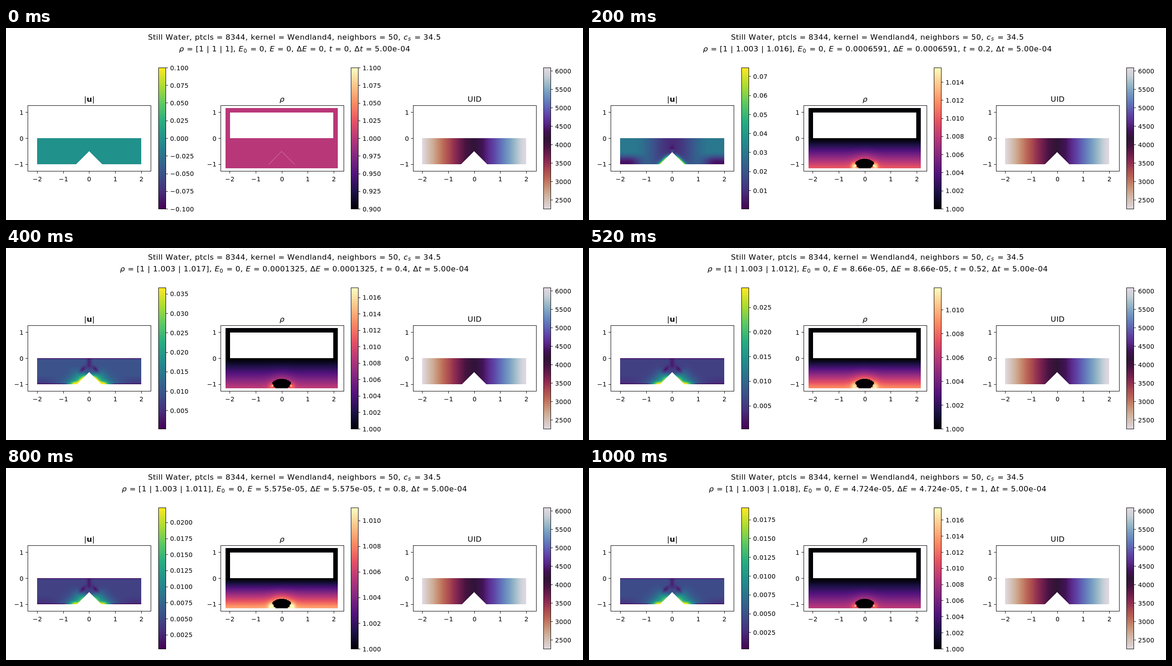
Write an HTML page with a canvas that moves like this. It is 1280 px wide and 427 px high and loops after 1020 ms.

```html
<!DOCTYPE html>
<html lang="en">
<head>
<meta charset="utf-8">
<title>Still Water</title>
<style>
html, body { margin: 0; width: 100%; height: 100%; overflow: hidden; background: #fff; }
canvas { display: block; width: 1280px; height: 427px; }
</style>
</head>
<body>
<canvas id="stage" width="1280" height="427"></canvas>
<script>
const ctx = document.getElementById('stage').getContext('2d');
const FONT = '"DejaVu Sans", sans-serif';
const BIG = 16.667, SMALL = 13.889;
const UNIT = 57.6, Y0 = 245.4;
const CX = [184.9, 612, 1039];
const BAR = { top: 88.5, h: 314, w: 16 };

const clamp = v => Math.max(0, Math.min(1, v));
const smooth = (a, b, v) => { const k = clamp((v - a) / (b - a)); return k * k * (3 - 2 * k); };
const bell = (v, w) => Math.exp(-(v * v) / (w * w));
const mix = (a, b, k) => a + (b - a) * k;

// Colour maps from evenly spaced stops
function colormap(stops) {
  const rgb = stops.split(' ').map(h => [0, 2, 4].map(i => parseInt(h.substr(i, 2), 16)));
  const lut = [];
  for (let i = 0; i < 256; i++) {
    const p = i / 255 * (rgb.length - 1), n = Math.min(rgb.length - 2, Math.floor(p));
    lut.push(rgb[n].map((c, j) => Math.round(mix(c, rgb[n + 1][j], p - n))));
  }
  return v => lut[Math.round(clamp(v) * 255)];
}
const viridis = colormap('440154 472d7b 3b528b 2c728e 21918c 28ae80 5ec962 addc30 fde725');
const magma = colormap('000004 1d1147 51127c 832681 b73779 e75263 fc8961 fec488 fcfdbf');
const twilight = colormap('e2d9e2 d5c4bc ceac94 c68a6f ba6657 a94950 8e2c50 6b1d4c 471340 ' +
  '2f1436 421257 59298a 5e43a5 6065b4 6785be 7ba1c2 9ebbc9 c9d0d7 e2d9e2');

// time, top speed, top density excess, energy
const KEYS = [
  [0.02, 0.2, 0.006, 0.03], [0.04, 0.26, 0.014, 0.02], [0.06, 0.2, 0.019, 0.015],
  [0.1, 0.16, 0.014, 0.008], [0.14, 0.11, 0.016, 0.003],
  [0.2, 0.0746, 0.01559, 0.0006591], [0.4, 0.0366, 0.01718, 0.0001325],
  [0.52, 0.029, 0.01187, 8.66e-5], [0.64, 0.0255, 0.0114, 6.75e-5],
  [0.8, 0.0223, 0.011, 5.575e-5], [1, 0.0191, 0.01752, 4.724e-5]
];
function sample(t) {
  let i = 0;
  while (i < KEYS.length - 2 && KEYS[i + 1][0] <= t) i++;
  const a = KEYS[i], b = KEYS[i + 1], k = clamp((t - a[0]) / (b[0] - a[0]));
  return [1, 2, 3].map(j => Math.exp(mix(Math.log(a[j]), Math.log(b[j]), k)));
}

function g4(v) {
  if (!v) return '0';
  if (v >= 1e-4) return String(Number(v.toPrecision(4)));
  return v.toExponential(3).replace(/\.?0*e-(\d)$/, 'e-0$1');
}

// Runs of [text, style]: i italic, b bold, s subscript.
// Every glyph advances by whole pixels, rounded up.
function rich(runs, x, y, size = BIG, align = 0.5) {
  const glyphs = [];
  let width = 0;
  for (const [s, st = ''] of runs) {
    const sub = st.includes('s');
    const font = (st.includes('i') ? 'italic ' : '') + (st.includes('b') ? 'bold ' : '') +
      size * (sub ? 0.7 : 1) + 'px ' + FONT;
    ctx.font = font;
    for (const ch of s) {
      glyphs.push([ch, font, width, sub ? 2.7 : 0]);
      width += Math.ceil(ctx.measureText(ch).width);
    }
    if (sub) width++;
  }
  const left = Math.round(x - width * align);
  ctx.textAlign = 'left';
  for (const [ch, font, dx, dy] of glyphs) {
    ctx.font = font;
    ctx.fillText(ch, left + dx, Math.round(y + dy));
  }
}

const label = (s, x, y, align) => rich([[s]], x, y, SMALL, align);

function line(x1, y1, x2, y2) {
  ctx.beginPath();
  ctx.moveTo(x1, y1);
  ctx.lineTo(x2, y2);
  ctx.stroke();
}

const snap = v => Math.floor(v) + 0.5;
const signed = (v, d) => (v < -1e-9 ? '\u2212' : '') + Math.abs(v).toFixed(d);

function axes(cx, title) {
  const left = snap(cx - 136), bottom = 318.5;
  ctx.strokeRect(left, 172.5, 273, 146);
  for (let v = -2; v <= 2; v++) {
    const x = snap(cx + v * UNIT);
    line(x, bottom, x, bottom + 5);
    label(signed(v, 0), cx + v * UNIT, 341, 0.5);
  }
  for (let v = -1; v <= 1; v++) {
    const y = Y0 - v * UNIT;
    line(left - 5, snap(y), left, snap(y));
    label(signed(v, 0), left - 9.7, y + 5.1, 1);
  }
  rich(title, cx, 164);
}

function tickStep(range) {
  for (let e = -6; ; e++)
    for (const m of [1, 2, 2.5, 5]) {
      const step = m * 10 ** e;
      if (range / step <= 9.001) return [step, Math.max(0, m === 2.5 ? 1 - e : -e)];
    }
}

function colorbar(x, map, lo, hi) {
  const { top, h, w } = BAR;
  for (let i = 0; i < h; i++) {
    ctx.fillStyle = `rgb(${map(1 - (i + 0.5) / h)})`;
    ctx.fillRect(x, top + i + 0.5, w, 1);
  }
  ctx.fillStyle = '#000';
  ctx.strokeRect(x + 0.5, top, w, h);
  const [step, digits] = tickStep(hi - lo);
  for (let n = Math.ceil(lo / step - 1e-6); n * step <= hi + step * 1e-6; n++) {
    const y = top + h * (1 - (n * step - lo) / (hi - lo));
    line(x + w, snap(y), x + w + 5, snap(y));
    label(signed(n * step, digits), x + w + 10.2, y + 5.1, 0);
  }
}

// Paints a box of pixels; shade(x, y, px, py) gives a colour or nothing
const buffer = document.createElement('canvas');
const bctx = buffer.getContext('2d');
function field(cx, x0, y0, w, h, shade) {
  buffer.width = w;
  buffer.height = h;
  const img = bctx.createImageData(w, h);
  for (let j = 0, p = 0; j < h; j++)
    for (let i = 0; i < w; i++, p += 4) {
      const px = x0 + i + 1 - cx, py = y0 + j + 0.5;
      const c = shade(px / UNIT, (Y0 - py) / UNIT, px, py);
      if (c) {
        img.data.set(c, p);
        img.data[p + 3] = 255;
      }
    }
  bctx.putImageData(img, 0, 0);
  ctx.drawImage(buffer, x0, y0);
}

// The fluid settles slightly onto the wedge once it moves
const inWedge = (x, y, t) => y < -0.5 - Math.abs(x) - (t ? 0.025 : 0);

function speed(x, y, t) {
  const a = Math.abs(x);
  const d = Math.max(0, (y + 0.5 + a) / Math.SQRT2);   // off the slope
  const s = (a - y - 0.5) / Math.SQRT2;                // along the slope
  const late = smooth(0.2, 0.38, t);
  const along = smooth(0.02, 0.42, s) * (1 - 0.9 * smooth(0.74, 0.95, s));

  let early = 0.12 + 0.28 * smooth(0, 1.5, a);
  early *= 1 - 0.9 * smooth(0.8, 1.7, a) * smooth(0.5, 0.95, -y);
  early += 0.65 * Math.exp(-d / 0.05) * along + 0.25 * bell(Math.hypot(x, y + 0.48), 0.05);
  early *= 1 - 0.5 * bell(Math.hypot(x / 0.7, y + 0.38), 0.12);
  if (t < 0.16) early = mix(0.9 * Math.cos(Math.PI / 2 * -y) + 0.1 * along * Math.exp(-d / 0.1),
    early, smooth(0.04, 0.16, t));
  if (!late) return early;

  let calm = mix(0.25, 0.18, smooth(0.4, 0.55, t)) + 0.05 * smooth(0.7, 1, t);
  calm *= 1 - 0.3 * smooth(0.9, 1.9, a) * smooth(0.6, 1, -y);
  calm *= 1 - 0.6 * bell(x, 0.09) * smooth(-0.5, -0.25, y);
  calm += 0.3 * bell(d, 0.34) * smooth(0.08, 0.45, s);
  calm += mix(0.45, 0.25, smooth(0.4, 0.6, t)) * Math.exp(-d / 0.06) * smooth(0, 0.35, s);
  calm += 0.35 * bell(Math.hypot(a - 0.57, (y + 0.98) * 2), 0.16);
  calm *= 1 - 0.7 * bell(d - 0.23, 0.07) * bell(s - 0.11, 0.16);
  calm *= smooth(-0.03, 0.06, -y);
  calm *= 1 - 0.7 * smooth(0.75, 1, a) * smooth(0.95, 0.98, -y);
  return mix(early, calm, late);
}

function excess(x, y, t, top) {
  const a = Math.abs(x);
  const swell = 1 - Math.cos(2 * Math.PI * t / 0.116) * Math.exp(-t / 0.05);
  const lift = 1 + 0.1 * (1 - smooth(0.2, 0.35, t));
  const depth = Math.min(1.08, Math.max(0, -y - 0.04));
  let v = 0.0082 * depth * swell * lift;
  v += 0.0027 * swell * bell(Math.hypot(x / 0.42, (y + 1.02) / 0.4), 1);
  const flank = Math.hypot(a - 0.42, (y + 1.07) * 0.7);
  v += mix(0.0042, 0.0018, smooth(0.2, 0.35, t)) * bell(flank, 0.1);
  v += Math.max(0, top - 0.0118) * bell(Math.hypot(a - 0.36, y + 1.06), 0.03);
  return v;
}

const GRID = 1.8;
const cell = v => Math.round(v / GRID) * GRID;
function inCore(px, py) {
  const a = Math.abs(cell(px)), y = cell(py);
  return y > 291 + 0.018 * a * a && a < 21.5 - Math.max(0, y - 300) * 0.65;
}

// Share of the fluid area left of x
function share(x) {
  const cut = x <= -0.5 ? 0 : x <= 0 ? (x + 0.5) ** 2 / 2 : x < 0.5 ? 0.25 - (0.5 - x) ** 2 / 2 : 0.25;
  return (x + 2 - cut) / 3.75;
}

function draw(step) {
  const t = step * 0.02, rest = step === 0;
  const [top, dense, energy] = rest ? [0, 0, 0] : sample(t);
  const mean = rest ? 0 : 0.0031 * (1 - Math.cos(2 * Math.PI * t / 0.116) * Math.exp(-t / 0.05));

  ctx.fillStyle = '#fff';
  ctx.fillRect(0, 0, 1280, 427);

  field(CX[0], 69, 245, 231, 58, (x, y) =>
    inWedge(x, y, t) ? null : viridis(rest ? 0.5 : speed(x, y, t)));

  field(CX[1], 487, 178, 249, 134, (x, y, px, py) => {
    if (Math.abs(px) < 114.4 && py > 188 && py < 245) return null;
    if (rest) return magma(0.5);
    if (py < 245 || inCore(px, py)) return magma(0);
    return magma(excess(x, y, t, dense) / dense);
  });

  field(CX[2], 923, 245, 231, 58, (x, y) =>
    inWedge(x, y, t) ? null : twilight(share(x)));

  if (rest) {
    ctx.fillStyle = '#f3dfe9';
    for (let i = 0; i <= 14; i++)
      for (const side of [-1, 1]) ctx.fillRect(611 + side * i * 2, 274 + i * 2, 1, 1);
  }

  ctx.fillStyle = ctx.strokeStyle = '#000';
  ctx.lineWidth = 1;
  axes(CX[0], [['|'], ['u', 'b'], ['|']]);
  axes(CX[1], [['ρ', 'i']]);
  axes(CX[2], [['UID']]);

  colorbar(338, viridis, rest ? -0.1 : 0.0003, rest ? 0.1 : top);
  colorbar(765, magma, rest ? 0.9 : 1, rest ? 1.1 : 1 + dense);
  colorbar(1192, twilight, 2256, 6090);

  rich([['Still Water, ptcls = 8344, kernel = Wendland4, neighbors = 50, '],
    ['c', 'i'], ['s', 'si'], [' = 34.5']], 640, 25.6);
  rich([['ρ', 'i'], [` = [1 | ${g4(1 + mean)} | ${g4(1 + dense)}], `],
    ['E', 'i'], ['0', 's'], [' = 0, '],
    ['E', 'i'], [` = ${g4(energy)}, Δ`],
    ['E', 'i'], [` = ${g4(energy)}, `],
    ['t', 'i'], [` = ${Number(t.toFixed(2))}, Δ`],
    ['t', 'i'], [' = 5.00e-04']], 640, 52.2);
}

const start = performance.now();
let shown = -1;
function tick() {
  const step = Math.floor(((performance.now() - start) % 1020) / 20);
  if (step !== shown) draw(shown = step);
  requestAnimationFrame(tick);
}
tick();
</script>
</body>
</html>
```
